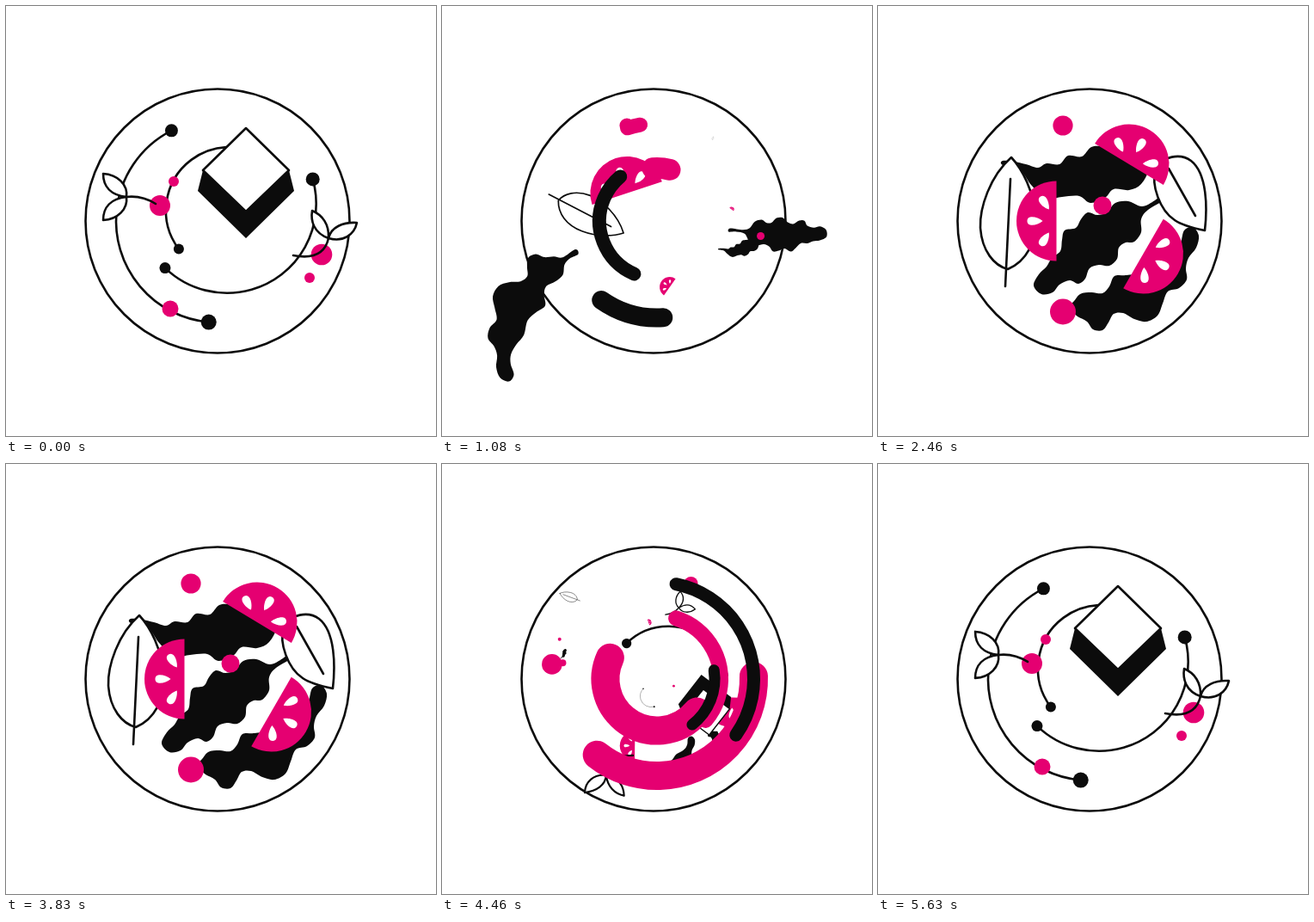
Write an HTML page with a canvas that moves like this. It is 500 px wide and 500 px high and loops after 7 s.

```html
<!DOCTYPE html>
<html lang="en">
<head>
<meta charset="utf-8">
<title>Plate loop</title>
<style>
html, body { margin: 0; width: 100%; height: 100%; overflow: hidden; background: #fff; }
canvas { display: block; width: 100vw; height: 100vh; }
</style>
</head>
<body>
<canvas id="stage" width="500" height="500"></canvas>
<script>
const ctx = document.getElementById('stage').getContext('2d');
const LOOP = 7000, C = 250, PINK = '#e50071', INK = '#0c0c0c', LINE = 2.6;
const rad = d => d * Math.PI / 180;
const clamp = v => Math.min(1, Math.max(0, v));

// Smooth interpolation through rows of [time, value, ...]
function track(rows, t, col = 1) {
  const last = rows.length - 1;
  if (t <= rows[0][0]) return rows[0][col];
  if (t >= rows[last][0]) return rows[last][col];
  let i = 0;
  while (t > rows[i + 1][0]) i++;
  const slope = j => j < 1 || j >= last ? 0
    : (rows[j + 1][col] - rows[j - 1][col]) / (rows[j + 1][0] - rows[j - 1][0]);
  const [a, b] = [rows[i], rows[i + 1]];
  const h = b[0] - a[0], u = (t - a[0]) / h, v = u * u * (3 - 2 * u);
  return a[col] * (1 - v) + b[col] * v
    + h * u * (1 - u) * ((1 - u) * slope(i) - u * slope(i + 1));
}

function disc(x, y, r, color) {
  if (r <= 0) return;
  ctx.beginPath();
  ctx.arc(x, y, r, 0, 2 * Math.PI);
  ctx.fillStyle = color;
  ctx.fill();
}

function stroke(path) {
  ctx.lineWidth = LINE;
  ctx.strokeStyle = INK;
  path ? ctx.stroke(path) : ctx.stroke();
}

function outline(path) {
  ctx.fillStyle = '#fff';
  ctx.fill(path);
  stroke(path);
}

// Closed curve through points
function blob(pts) {
  const n = pts.length / 2, at = i => { i = (i + n) % n * 2; return [pts[i], pts[i + 1]]; };
  const p = new Path2D();
  p.moveTo(...at(0));
  for (let i = 0; i < n; i++) {
    const [a, b, c, d] = [at(i - 1), at(i), at(i + 1), at(i + 2)];
    p.bezierCurveTo(b[0] + (c[0] - a[0]) / 6, b[1] + (c[1] - a[1]) / 6,
      c[0] - (d[0] - b[0]) / 6, c[1] - (d[1] - b[1]) / 6, c[0], c[1]);
  }
  return p;
}

// Poses are [angle around the plate, own turn, radius shift, scale]
const part = (x, y, draw, enter, leave, more) => ({ x, y, draw, enter, leave, late: 0, rate: 1, ...more });

const dot = (x, y, r, enter, leave, more) =>
  part(x, y, () => disc(x, y, r, PINK), enter, leave, more);

function lettuce(x, y, pts, enter, leave, more) {
  const path = blob(pts);
  return part(x, y, () => { ctx.fillStyle = INK; ctx.fill(path); }, enter, leave, more);
}

const seed = new Path2D('M16 0C22 -5 34 -7.5 34 0C34 7.5 22 5 16 0Z');
function tomato(x, y, dir, enter, leave) {
  return part(x, y, () => {
    ctx.translate(x, y);
    ctx.rotate(rad(dir));
    ctx.beginPath();
    ctx.arc(0, 0, 46.5, -Math.PI / 2, Math.PI / 2);
    ctx.fillStyle = PINK;
    ctx.fill();
    ctx.fillStyle = '#fff';
    ctx.rotate(rad(-57));
    for (let i = 0; i < 3; i++) {
      ctx.fill(seed);
      ctx.rotate(rad(57));
    }
  }, enter, leave);
}

function plant(x, y, fills, line, enter, leave, more) {
  const shapes = fills.map(d => new Path2D(d)), stem = new Path2D(line);
  return part(x, y, () => {
    shapes.forEach(outline);
    stroke(stem);
  }, enter, leave, more);
}

// Arc with a dot on each end; the cuts trim it while leaving
function orbit(x, y, r, a0, a1, dotA, dotB, cutA, cutB, shrink, enter, leave) {
  return part(x, y, (g, fade) => {
    const extra = (1 - fade) * 150;
    const a = a0 + cutA * g + (cutA ? extra : 0), b = a1 - cutB * g - (cutB ? extra : 0);
    if (b > a) {
      ctx.beginPath();
      ctx.arc(x, y, r, rad(a), rad(b));
      stroke();
    }
    for (const [deg, size] of [[a0, dotA], [a1, dotB]])
      disc(x + r * Math.cos(rad(deg)), y + r * Math.sin(rad(deg)), size * (1 - shrink * g) * fade, INK);
  }, enter, leave, { keep: true });
}

const boxSide = new Path2D('M229 191L279 239L329 191L335 215L279 270L223 215Z');
const boxTop = new Path2D('M279 142L329 191L279 239L229 191Z');

const garden = [
  orbit(246, 250, 118, 95, 243, 9, 7.5, 0, 20, 0.42, [170, 170, 0, -0.1], [-80, -80, 0, 1]),
  orbit(260, 238, 74, 143, 267, 6, 0, 0, 124, 1.1, [83, 83, 0, 0.94], [-80, -80, 0, 1]),
  orbit(257, 230, 103.7, -16, 134, 8, 6.5, 29, 0, 0.38, [180, 90, 0, 0.12], [-80, -80, 0, 1]),
  part(279, 206, () => {
    ctx.fillStyle = INK;
    ctx.fill(boxSide);
    outline(boxTop);
  }, [85, 173, 11, 0.55], [-63, -150, 42, 0]),
  dot(195, 204, 6, [83, 0, 0, 0.1], [-149, 0, 0, -0.2]),
  dot(191, 352, 9.5, [170, 0, 0, 0.85], [-149, 0, 0, 1.2]),
  dot(353, 316, 6, [170, 0, 0, 0.33], [-149, 0, 0, 1]),
  dot(179, 232, 12, [94, 0, 0, 0], [-149, 0, 0, -0.2]),
  dot(367, 289, 12.3, [170, 0, 0, 0.96], [-149, 0, 0, 0.73]),
  plant(140, 222, [
    'M140 222C142 208 130 196 113 195C113 210 122 220 140 222Z',
    'M140 222C142 236 130 248 113 249C113 234 122 224 140 222Z'
  ], 'M140 222Q158 220 174 230', [93, 140, -27, 0.5], [-80, -150, 0, -0.2], { rate: 0.8 }),
  plant(375, 270, [
    'M375 270C358 264 354 250 356 238C368 243 376 254 375 270Z',
    'M375 270C378 257 392 251 408 252C405 266 392 275 375 270Z'
  ], 'M334 290C350 293 370 293 375 270', [109, 170, 0, 0.85], [-80, -150, 0, -0.2], { rate: 0.8 })
];

const salad = [
  lettuce(240, 195, [
    145, 180, 158, 181, 172, 184, 186, 188, 196, 183, 211, 184, 221, 174, 237, 175, 248, 164,
    262, 163, 285, 165, 305, 175, 314, 190, 306, 207, 292, 214, 274, 213, 264, 223, 247, 229,
    234, 221, 214, 222, 195, 224, 178, 208, 166, 192, 145, 185
  ], [100, -8, 40, 0.42], [-64, -64, 56, 0.08], { late: 80 }),
  lettuce(255, 280, [
    333, 217, 322, 226, 307, 233, 291, 227, 276, 229, 266, 240, 255, 243, 244, 240, 236, 248,
    230, 258, 217, 261, 214, 272, 212, 285, 202, 293, 196, 303, 187, 312, 181, 325, 190, 335,
    203, 333, 211, 324, 223, 319, 233, 323, 241, 317, 246, 305, 257, 301, 269, 302, 278, 294,
    280, 281, 288, 275, 298, 274, 306, 263, 306, 248, 314, 237, 335, 224
  ], [-76, -142, 115, 0.61], [-35, 80, 66, 0.2]),
  lettuce(290, 320, [
    204, 347, 216, 348, 226, 345, 235, 335, 248, 333, 261, 334, 269, 326, 275, 314, 289, 313,
    304, 310, 318, 297, 332, 292, 345, 285, 352, 275, 356, 261, 366, 257, 373, 267, 370, 281,
    361, 293, 358, 305, 359, 318, 350, 328, 337, 332, 331, 346, 325, 360, 312, 367, 298, 364,
    285, 357, 274, 358, 268, 368, 261, 377, 250, 376, 243, 367, 232, 361, 223, 354, 204, 354
  ], [85, 148, 96, 0.91], [23, -10, 20, 0.45]),
  plant(151, 250, [
    'M155 176C130 198 118 235 119 258C121 285 135 302 151 306C172 297 185 275 183 245C181 215 168 190 155 176Z'
  ], 'M154 201L148 326', [6, 115, -17, 0.65], [43, -72, 40, 0.17]),
  plant(343, 183, [
    'M380 261C383 235 383 195 364 180C352 171 330 174 323 190C317 208 328 238 345 249C355 256 370 259 380 261Z'
  ], 'M338 189L369 244', [-15, 166, 0, 0.3], [81, 160, 0, 0], { late: 160 }),
  tomato(292, 184, -59, [137, 275, 0, 0.25], [71, 150, 12, 0.75]),
  tomato(207.5, 250, 180, [43, 72, 5, 0.92], [81, 160, 24, 0.08]),
  tomato(308.5, 288, 30, [-42, -85, 18, 0.06], [75, 150, 12, 0.38]),
  dot(215, 139, 11.6, [0, 0, 0, 0.74], [81, 0, 0, 0]),
  dot(261, 232, 10.5, [67, 0, 101, 0.43], [81, 0, 0, 0.14]),
  dot(215, 355.5, 15, [0, 0, 0, -0.5], [81, 0, 0, 0.27], { late: 330 })
];

// Share of the enter pose that is left, by time
const settle = [
  [-380, 1.8], [-190, 1.4], [0, 1], [170, 0.42], [340, 0.12], [500, 0.022], [800, 0.004], [1000, 0]
];

function show(parts, t, entering, inAt, outAt, outLen) {
  const g = entering ? 0 : Math.max(0, (t - outAt) / outLen) ** 3;
  const fade = entering ? 1 : clamp(1 - (t - outAt - outLen) / 200);
  if (!fade) return;
  for (const p of parts) {
    const dt = (t - inAt - p.late) * p.rate;
    const k = entering ? track(settle, dt) : g;
    const [turn, spin, push, size] = entering ? p.enter : p.leave;
    let s = 1 + (size - 1) * k;
    if (entering) s *= clamp((dt + 300) / 250);
    else if (!p.keep) s *= fade;
    if (s <= 0.005) continue;
    const dx = p.x - C, dy = p.y - C;
    const r = Math.hypot(dx, dy) + push * k, a = Math.atan2(dy, dx) + rad(turn * k);
    ctx.save();
    ctx.translate(C + r * Math.cos(a), C + r * Math.sin(a));
    ctx.rotate(rad(spin * k));
    ctx.scale(s, s);
    ctx.translate(-p.x, -p.y);
    p.draw(g, fade);
    ctx.restore();
  }
}

// Thick strokes as rows of [time, start angle, end angle, width]
const sweep = (r, color, at, w, a, b, w2, a2, b2) => ({
  r, color, rows: [
    [at - 340, a - 50, a - 50, 0], [at, a, b, w],
    [at + 370, a2, b2, w2], [at + 520, b2 + 8, b2 + 8, 0]
  ]
});
const sweeps = [
  sweep(72, PINK, 710, 20, 6, 126, 0, 228, 230),
  sweep(61.5, PINK, 710, 24, 130, 230, 25, 265, 284),
  sweep(113.5, PINK, 710, 13, 91, 189, 17, 252, 260),
  sweep(112.5, INK, 710, 22, -14, 52, 22, 86, 125),
  sweep(67, INK, 710, 17, 23, 59, 16, 113, 230),
  sweep(112.5, PINK, 4460, 33, -2, 128, 20, 185, 205),
  sweep(74, PINK, 4460, 18, -73, 40, 12, 110, 150),
  sweep(60, PINK, 4460, 33, 39, 204, 20, 250, 275),
  sweep(112.5, INK, 4460, 15, -79, 35, 14, 95, 130),
  sweep(67, INK, 4460, 13, -9, 52, 12, 100, 180)
];

function drawSweep({ r, color, rows }, t) {
  if (t <= rows[0][0] || t >= rows[3][0]) return;
  const [a, b, w] = [1, 2, 3].map(col => track(rows, t, col));
  if (w < 0.3) return;
  ctx.beginPath();
  ctx.arc(C, C, r, rad(a), rad(Math.max(b, a + 0.1)));
  ctx.lineWidth = w;
  ctx.strokeStyle = color;
  ctx.stroke();
}

function render(t) {
  ctx.fillStyle = '#fff';
  ctx.fillRect(0, 0, 500, 500);
  ctx.lineCap = ctx.lineJoin = 'round';
  ctx.beginPath();
  ctx.arc(246, 250, 153.5, 0, 2 * Math.PI);
  stroke();
  if (t > 700 && t < 4700) show(salad, t, t < 3830, 1080, 3830, 630);
  if (t < 1000 || t > 4080) show(garden, t, t > 4080, 4460, 40, 670);
  sweeps.forEach(s => drawSweep(s, t));
}

const start = performance.now();
function tick() {
  render((performance.now() - start) % LOOP);
  requestAnimationFrame(tick);
}
tick();
</script>
</body>
</html>
```
